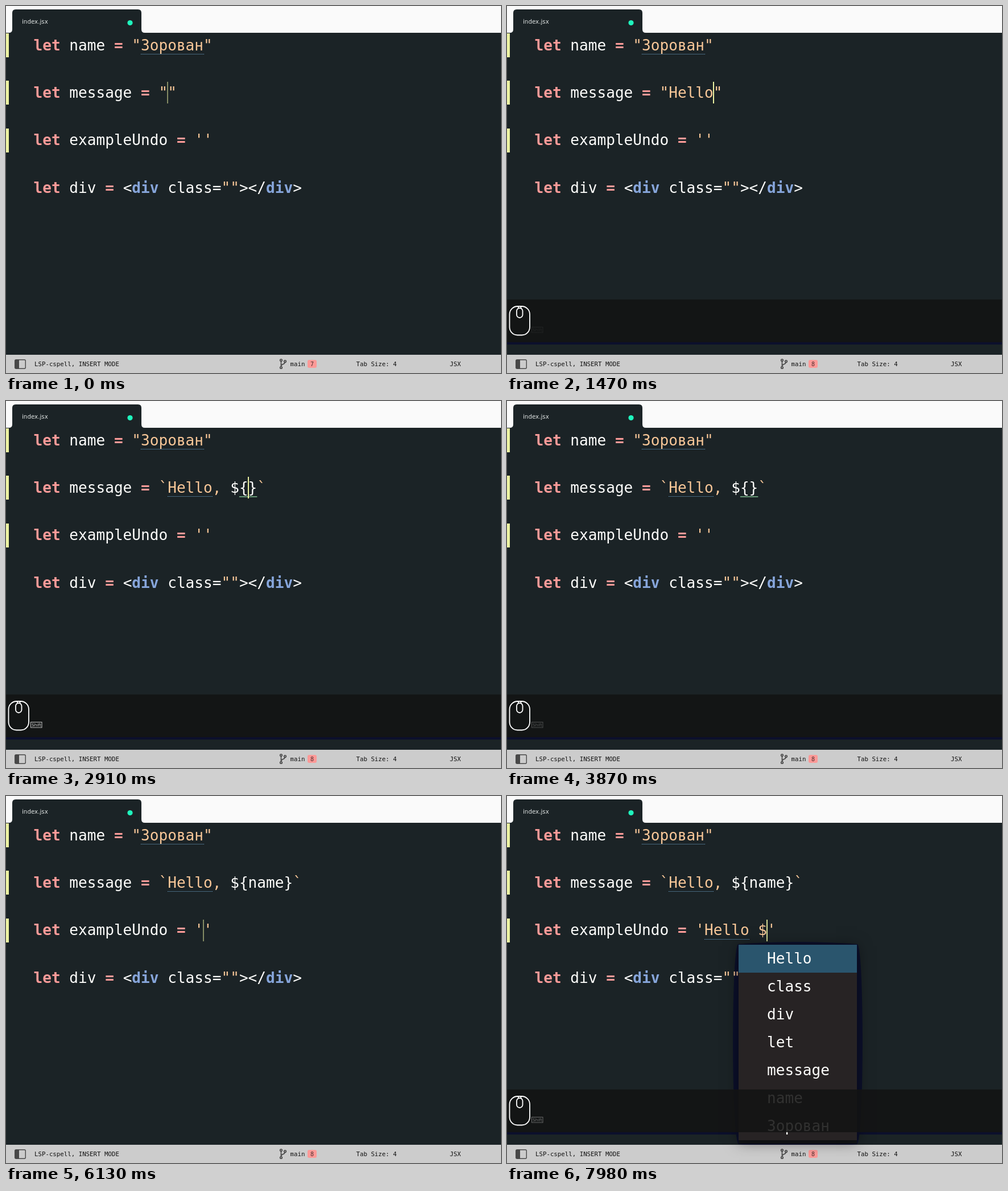
An HTML page with a canvas that plays this animation: 870x644 px, repeating every 8000 ms.

```html
<!DOCTYPE html>
<html lang="en">
<head>
<meta charset="utf-8">
<title>Editor</title>
<style>
  html, body { margin: 0; width: 100%; height: 100%; overflow: hidden; background: #1b2326; }
  canvas { display: block; width: 870px; height: 644px; }
</style>
</head>
<body>
<canvas id="stage" width="870" height="644"></canvas>
<script>
const ctx = document.getElementById('stage').getContext('2d');
const LOOP = 8000;
const MONO = '"DejaVu Sans Mono", monospace';
const SIZE = 26.1, ADVANCE = SIZE * 0.60205, LEFT = 48.5, LINE = 41.67, TOP = 48;
const C = {
  bg: '#1b2326', text: '#fdfdfb', key: '#fb9a98', str: '#f8c798', tag: '#86a5da',
  caret: '#edf3a2', sel: '#2a556d', menu: '#272324', navy: '#0c102c', bar: '#cccccc', icon: '#484848'
};
const NAME = 'Зорован';

// Typed text: [time, value]
const message = [[0, ''], [640, 'H'], [940, 'He'], [1100, 'Hel'], [1250, 'Hell'], [1400, 'Hello'],
  [1700, 'Hello,'], [1840, 'Hello, '], [2190, 'Hello, $'], [2800, 'Hello, ${}'],
  [3990, 'Hello, ${n}'], [4130, 'Hello, ${na}'], [4260, 'Hello, ${nam}'], [4480, 'Hello, ${name}']];
const undo = [[0, ''], [6270, 'H'], [6620, 'He'], [6760, 'Hel'], [6900, 'Hell'], [7050, 'Hello'],
  [7250, 'Hello '], [7540, 'Hello $']];

// Caret: [time, row, column]
const caret = [[-630, 2, 15], [640, 2, 16], [940, 2, 17], [1100, 2, 18], [1250, 2, 19], [1400, 2, 20],
  [1700, 2, 21], [1840, 2, 22], [2190, 2, 23], [2800, 2, 24], [2880, 2, 24], [3990, 2, 25],
  [4130, 2, 26], [4260, 2, 27], [4480, 2, 28], [4690, 2, 29], [4980, 3, 0], [5150, 4, 20],
  [5500, 4, 19], [6270, 4, 20], [6620, 4, 21], [6760, 4, 22], [6900, 4, 23], [7050, 4, 24],
  [7250, 4, 25], [7540, 4, 26]];

// Completion menus: matched letters follow what has been typed
const menus = [
  { from: 670, to: 1450, row: 2, col: 15, width: 208, items: ['Hello'], typed: t => at(message, t)[1].length },
  { from: 2240, to: 2800, row: 2, col: 23, width: 208, items: ['class', 'div', 'let', 'name', NAME], typed: () => 0 },
  { from: 4040, to: 4480, row: 2, col: 24, width: 239, items: ['name'], typed: t => at(message, t)[1].length - 10 },
  { from: 6320, to: 7100, row: 4, col: 19, width: 208, items: ['Hello'], typed: t => at(undo, t)[1].length },
  { from: 7590, to: LOOP, row: 4, col: 26, width: 208,
    items: ['Hello', 'class', 'div', 'let', 'message', 'name', NAME], typed: () => 0 }
];
const panelTimes = [[90, 1700], [1930, 4530], [6170, LOOP]];
const shiftKeys = [[90, 0], [180, 1], [940, 1], [1520, 0], [1930, 0], [1980, 1], [3210, 1], [4200, 0],
  [6170, 0], [6250, 1], [6570, 1], [7250, 0], [7460, 0], [7500, 1], [7840, 1], [8060, 0.2]];

function at(list, t) {
  let hit = list[0];
  for (const step of list) if (step[0] <= t) hit = step;
  return hit;
}

function blend(keys, t) {
  if (t <= keys[0][0]) return keys[0][1];
  for (let i = 1; i < keys.length; i++) {
    const [a, va] = keys[i - 1], [b, vb] = keys[i];
    if (t <= b) return va + (vb - va) * (t - a) / (b - a);
  }
  return keys[keys.length - 1][1];
}

const colX = col => LEFT + col * ADVANCE;
const rowY = row => TOP + row * LINE;

function rect(x, y, w, h, color) {
  ctx.fillStyle = color;
  ctx.fillRect(x, y, w, h);
}

function text(str, x, y, color, font) {
  ctx.font = font;
  ctx.fillStyle = color;
  ctx.fillText(str, x, y);
}

function box(x, y, w, h, r) {
  ctx.beginPath();
  ctx.roundRect(x, y, w, h, r);
}

function disc(x, y, r, color) {
  ctx.fillStyle = color;
  ctx.beginPath();
  ctx.arc(x, y, r, 0, Math.PI * 2);
  ctx.fill();
}

function code(str, x, y, color, bold) {
  text(str, x, y, color, (bold ? 'bold ' : '') + SIZE + 'px ' + MONO);
}

// Each token is [text, colour, bold]
function codeLine(row, tokens) {
  let col = 0;
  for (const [str, color, bold] of tokens) {
    code(str, colX(col), rowY(row) + 29.7, color, bold);
    col += str.length;
  }
}

const declare = name => [['let ', C.key, true], [name, C.text], [' = ', C.key, true]];

function dotted(row, col, len) {
  const y = Math.round(rowY(row) + 36);
  for (let x = Math.round(colX(col)); x < colX(col + len); x += 2) rect(x, y, 1, 1, '#6fa6cf');
}

function matchLine(col) {
  rect(colX(col), rowY(2) + 36, ADVANCE, 1.3, '#8fd6a0');
}

function drawCode(t) {
  const msg = at(message, t)[1], und = at(undo, t)[1];
  const template = t >= 2860;
  codeLine(0, [...declare('name'), [`"${NAME}"`, C.str]]);
  codeLine(2, [...declare('message'), ...(template
    ? [['`Hello, ', C.str], [msg.slice(7), C.text], ['`', C.str]]
    : [[`"${msg}"`, C.str]])]);
  codeLine(4, [...declare('exampleUndo'), [`'${und}'`, C.str]]);
  codeLine(6, [...declare('div'), ['<', C.text], ['div', C.tag, true], [' class=', C.text],
    ['""', C.str], ['></', C.text], ['div', C.tag, true], ['>', C.text]]);

  dotted(0, 12, 7);
  if (t >= 2900) dotted(2, 15, 5);
  if (t >= 7350) dotted(4, 19, 5);
  if (t >= 2880 && t < 4690) {
    matchLine(23);
    matchLine(msg.length + 14);
  }
  for (const row of [0, 2, 4]) rect(0, Math.round(rowY(row)), 5, 42, C.caret);
}

function drawCaret(t) {
  const [start, row, col] = at(caret, t);
  const idle = Math.max(0, t - start - 300);
  ctx.globalAlpha = 0.5 + 0.5 * Math.cos(idle / 660 * Math.PI);
  rect(Math.round(colX(col)) - 1, Math.round(rowY(row)) + 2, 2, 38, C.caret);
  ctx.globalAlpha = 1;
}

const ROW_H = 49;
const menuBox = m => ({
  x: Math.round(colX(m.col) - 50), y: Math.round(rowY(m.row) + 46.5), w: m.width, h: m.items.length * ROW_H
});

function menuGlow(m) {
  const { x, y, w, h } = menuBox(m), r = x + w, b = y + h + 7, mid = x + w / 2;
  ctx.fillStyle = C.navy;
  ctx.beginPath();
  ctx.moveTo(x - 1, y - 1);
  ctx.quadraticCurveTo(mid, y - 9, r + 1, y - 1);
  ctx.bezierCurveTo(r + 13, y + 10, r + 13, b - 9, r, b);
  ctx.quadraticCurveTo(mid, b + 13, x, b);
  ctx.bezierCurveTo(x - 13, b - 9, x - 13, y + 10, x - 1, y - 1);
  ctx.fill();
  rect(x, y + h, w, 6, '#131619');
}

function drawMenu(m, t) {
  const { x, y, w, h } = menuBox(m);
  ctx.save();
  ctx.shadowColor = 'rgba(0,0,0,.5)';
  ctx.shadowBlur = 24;
  ctx.shadowOffsetY = 3;
  rect(x, y, w, h, C.menu);
  ctx.restore();
  rect(x, y, w, ROW_H, C.sel);
  const n = m.typed(t);
  m.items.forEach((item, i) => {
    const base = y + i * ROW_H + 33;
    code(item.slice(0, n), x + 50, base, C.key, true);
    code(item.slice(n), x + 50 + n * ADVANCE, base, C.text);
  });
}

function drawTabs() {
  rect(0, 0, 870, 47, '#fafafa');
  ctx.fillStyle = C.bg;
  ctx.beginPath();
  ctx.moveTo(5, 47);
  ctx.quadraticCurveTo(11, 47, 11, 41);
  ctx.lineTo(11, 12);
  ctx.quadraticCurveTo(11, 6, 17, 6);
  ctx.lineTo(232, 6);
  ctx.quadraticCurveTo(238, 6, 238, 12);
  ctx.lineTo(238, 41);
  ctx.quadraticCurveTo(238, 47, 244, 47);
  ctx.fill();
  text('index.jsx', 28, 31, '#dfe3e2', '10.3px "DejaVu Sans", sans-serif');
  disc(218, 29.5, 4.6, '#1ff5bd');
}

function drawStatus(t) {
  const font = '10.75px ' + MONO;
  rect(0, 612, 870, 32, C.bar);
  ctx.strokeStyle = C.icon;
  ctx.lineWidth = 1.4;
  box(15.7, 620.7, 18.6, 15.6, 2);
  ctx.stroke();
  rect(16, 621, 7, 15, C.icon);

  ctx.lineWidth = 1.7;
  ctx.beginPath();
  ctx.moveTo(483.5, 622);
  ctx.lineTo(483.5, 634);
  ctx.moveTo(490.5, 624);
  ctx.bezierCurveTo(490.5, 630, 484, 627, 483.5, 632);
  ctx.stroke();
  for (const [x, y] of [[483.5, 621.5], [490.5, 623.5], [483.5, 634.5]]) {
    disc(x, y, 2.6, C.icon);
    disc(x, y, 0.9, C.bar);
  }

  text('LSP-cspell, INSERT MODE', 50, 632, '#111', font);
  text('main', 499.5, 632, '#111', font);
  text('Tab Size: 4', 615.5, 632, '#111', font);
  text('JSX', 780, 632, '#111', font);
  ctx.fillStyle = '#fc9997';
  box(530, 621, 16, 14, 3);
  ctx.fill();
  text(t < 720 ? '7' : '8', 535, 632, '#4a2a2a', '10px ' + MONO);
}

function drawPanel(t) {
  rect(0, 515, 870, 75, 'rgba(19,19,19,.87)');
  ctx.strokeStyle = '#fff';
  ctx.lineWidth = 1.8;
  box(4.5, 527, 35.5, 50.5, 14);
  ctx.stroke();
  box(17, 530, 10.5, 17, 5.2);
  ctx.stroke();
  ctx.beginPath();
  ctx.moveTo(20, 527);
  ctx.lineTo(20, 531);
  ctx.moveTo(24.5, 527);
  ctx.lineTo(24.5, 531);
  ctx.stroke();

  ctx.globalAlpha = blend(shiftKeys, t);
  ctx.strokeStyle = '#c4c4c4';
  ctx.lineWidth = 1;
  ctx.strokeRect(43.5, 563.5, 19.5, 9.5);
  text('Shift', 45, 571, '#d0d0d0', '7.4px "DejaVu Sans", sans-serif');
  ctx.globalAlpha = 1;
}

function draw(t) {
  const menu = menus.find(m => t >= m.from && t < m.to);
  const panel = panelTimes.some(([a, b]) => t >= a && t < b);
  rect(0, 0, 870, 644, C.bg);
  if (panel) rect(0, 589, 870, 5, C.navy);
  if (menu) menuGlow(menu);
  drawCode(t);
  drawCaret(t);
  drawTabs();
  drawStatus(t);
  if (menu) drawMenu(menu, t);
  if (panel) drawPanel(t);
}

const begin = performance.now();
function tick() {
  draw((performance.now() - begin) % LOOP);
  requestAnimationFrame(tick);
}
tick();
</script>
</body>
</html>
```
